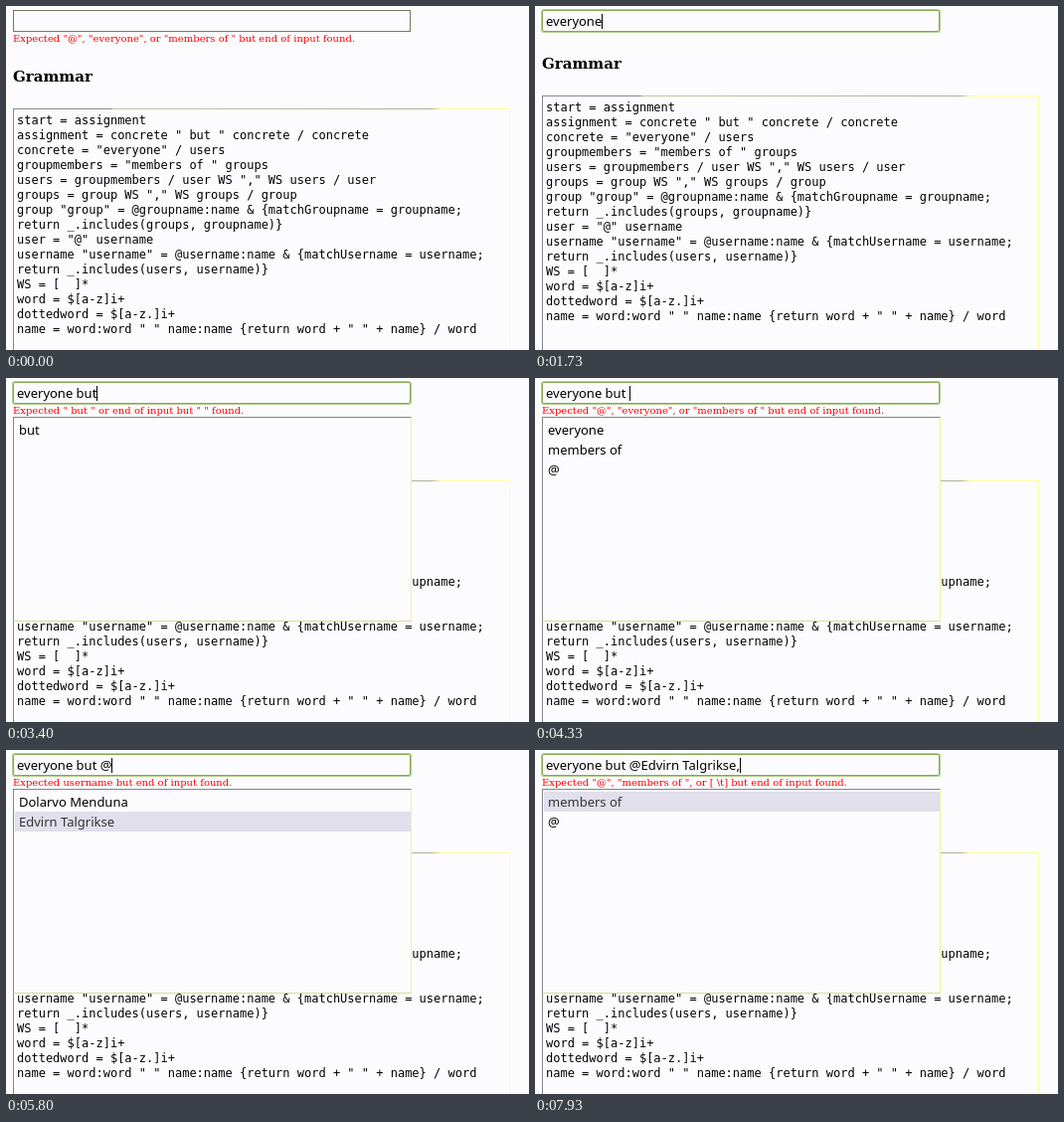
Animation, 526 px wide and 346 px high, one loop 8000 ms. Source, as an HTML page:

```html
<!DOCTYPE html>
<html lang="en">
<head>
<meta charset="utf-8">
<title>Grammar autocomplete</title>
<style>
  html, body { margin: 0; width: 100%; height: 100%; overflow: hidden; background: #fcfcfe; }
  #stage { position: relative; width: 526px; height: 346px; overflow: hidden; background: #fcfcfe; color: #000; }
  #stage > * { position: absolute; box-sizing: border-box; white-space: pre; }

  #field, #list { font: 13px/18px "Noto Sans", sans-serif; }
  #field { left: 7px; top: 4px; width: 400px; height: 22px; padding: 1px 3px; border: 1px solid #77775f; }
  #field.focus { border-color: #86a850; border-radius: 2px; box-shadow: 0 0 0 1px #b4cf8c; }
  #caret { display: none; width: 1px; height: 15px; margin-right: -1px; background: #000; vertical-align: -3px; }
  .focus #caret { display: inline-block; }

  #error { left: 7px; top: 27px; font: 10px/12px "DejaVu Serif", serif; color: #f00; }

  #page { left: 0; top: 0; width: 526px; height: 400px; }
  #page.raised { top: -13px; }
  #page > * { position: absolute; box-sizing: border-box; margin: 0; }
  h3 { left: 7px; top: 62px; font: bold 15px/18px "DejaVu Serif", serif; }
  #grammar {
    left: 7px; top: 103px; width: 500px; height: 290px; padding: 5px 4px 4px 3px;
    font: 12px/15px "DejaVu Sans Mono", monospace;
    border-left: 1px solid #85858f; border-right: 1px solid #ffffa0;
    background: linear-gradient(90deg, #8c8c96 98px, #c8c8a4 100px, #b0b09c 420px, #ffff98 430px) 0 0 / 100% 1px no-repeat;
  }

  #list {
    left: 7px; top: 39px; width: 401px; height: 206px; padding: 2px 0 0 1px;
    line-height: 20px; background: #fcfcfe;
    border: 1px solid #85858f; border-right-color: #f2f29a; border-bottom-color: #dcdc94;
  }
  #list div { padding-left: 4px; }
  #list .on { background: #e1dfec; color: #333; }
</style>
</head>
<body>
<div id="stage">
  <div id="page">
    <h3>Grammar</h3>
    <pre id="grammar">start = assignment
assignment = concrete " but " concrete / concrete
concrete = "everyone" / users
groupmembers = "members of " groups
users = groupmembers / user WS "," WS users / user
groups = group WS "," WS groups / group
group "group" = @groupname:name &amp; {matchGroupname = groupname;
return _.includes(groups, groupname)}
user = "@" username
username "username" = @username:name &amp; {matchUsername = username;
return _.includes(users, username)}
WS = [  ]*
word = $[a-z]i+
dottedword = $[a-z.]i+
name = word:word " " name:name {return word + " " + name} / word</pre>
  </div>
  <div id="field"><span id="text"></span><span id="caret"></span></div>
  <div id="error"></div>
  <div id="list"></div>
</div>
<script>
  const LOOP = 8000;
  const $ = id => document.getElementById(id);
  const users = ["Dolarvo Menduna", "Edvirn Talgrikse"];
  const full = "everyone but @" + users[1];

  const hint = (expected, found = "end of input") => `Expected ${expected} but ${found} found.`;
  const start = [hint('"@", "everyone", or "members of "'), ["everyone", "members of", "@"]];
  const but = [hint('" but " or end of input', '" "'), ["but"]];
  const user = [hint("username"), users];
  const more = [hint('"@", "members of ", or [ \\t]'), ["members of", "@"]];
  const valid = ["", []];

  // [time, typed text, [error, suggestions], selected row]
  const steps = [
    [0, null, [start[0], []]],
    [130, "", start],
    [1200, "", start, 0],
    [1530, "everyone", valid],
    [1930, "everyone ", but],
    [2530, "everyone b", but],
    [3130, "everyone bu", but],
    [3270, "everyone but", but],
    [3700, "everyone but ", start],
    [4400, "everyone but @", user],
    [5200, "everyone but @", user, 0],
    [5500, "everyone but @", user, 1],
    [5870, full, valid],
    [7000, full + ",", more],
    [7530, full + ",", more, 0]
  ];

  let shown;
  function show(step) {
    if (step === shown) return;
    shown = step;
    const [, text, [error, items], selected] = step;
    $("text").textContent = text ?? "";
    $("field").classList.toggle("focus", text !== null);
    $("error").textContent = error;
    $("page").classList.toggle("raised", !error);
    $("list").style.display = items.length ? "block" : "none";
    $("list").replaceChildren(...items.map((item, i) => {
      const row = document.createElement("div");
      row.textContent = item;
      row.classList.toggle("on", i === selected);
      return row;
    }));
  }

  const origin = performance.now();
  function tick() {
    const t = (performance.now() - origin) % LOOP;
    show(steps.findLast(([at]) => at <= t));
    requestAnimationFrame(tick);
  }
  tick();
</script>
</body>
</html>
```
